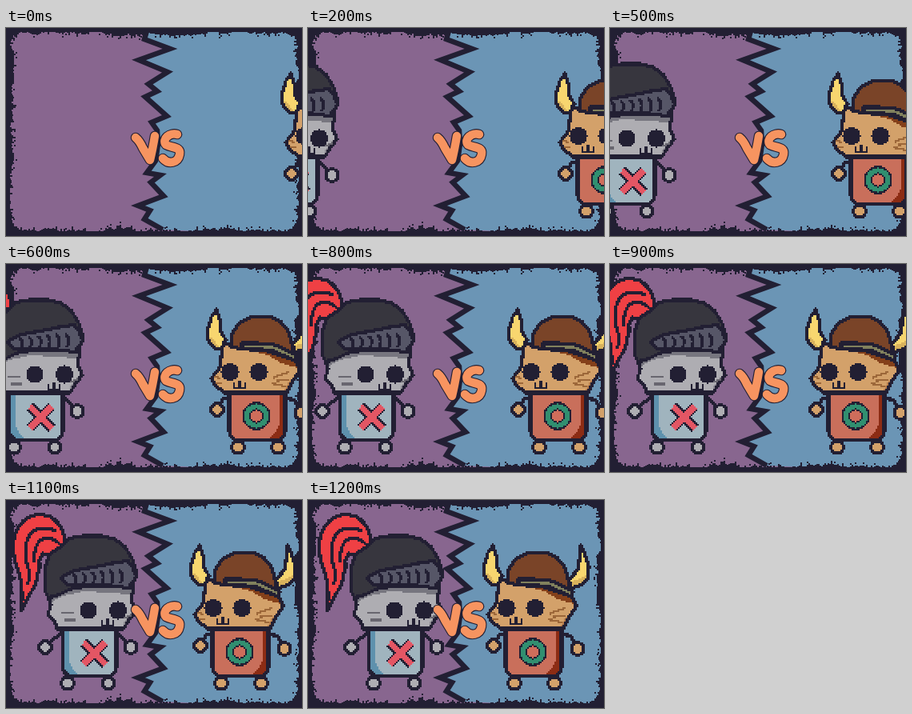
Recreate the animation shown at these times as an HTML page with a canvas. Size 370 px wide and 260 px high, loop 1300 ms.

```html
<!DOCTYPE html>
<html lang="en">
<head>
<meta charset="utf-8">
<title>Versus</title>
<style>
  html, body { margin: 0; width: 100%; height: 100%; overflow: hidden; background: #221f33; }
  canvas { display: block; width: 100vw; height: 100vh; image-rendering: pixelated; }
</style>
</head>
<body>
<canvas id="stage" width="370" height="260"></canvas>
<script>
const W = 370, H = 260, INK = '#221f33';
const STEP = 100, LOOP = 1300;

const newLayer = () => {
  const canvas = document.createElement('canvas');
  canvas.width = W;
  canvas.height = H;
  return canvas.getContext('2d');
};

function seeded(seed) {
  return () => (seed = (seed * 16807) % 2147483647) / 2147483647;
}

const disc = (x, y, r) => `M${x - r} ${y}a${r} ${r} 0 1 0 ${2 * r} 0a${r} ${r} 0 1 0 ${-2 * r} 0Z`;

// Plots vector shapes on a coarse grid for a hard-edged pixel look.
function pixelPen(ctx, cell = 2) {
  const plot = (color, test) => {
    ctx.fillStyle = color;
    for (let y = 0; y < H; y += cell)
      for (let x = 0; x < W; x += cell)
        if (test(x + cell / 2, y + cell / 2)) ctx.fillRect(x, y, cell, cell);
  };
  const fill = (d, color) => {
    const path = new Path2D(d);
    plot(color, (x, y) => ctx.isPointInPath(path, x, y));
  };
  const line = (d, color = INK, width = 4.4) => {
    const path = new Path2D(d);
    ctx.lineWidth = width;
    ctx.lineJoin = 'round';
    plot(color, (x, y) => ctx.isPointInStroke(path, x, y));
  };
  // Details are clipped to the shape and sit under its outline.
  const shape = (d, color, details = []) => {
    fill(d, color);
    const clip = new Path2D(d);
    for (const [detail, tint] of details) {
      const path = new Path2D(detail);
      plot(tint, (x, y) => ctx.isPointInPath(clip, x, y) && ctx.isPointInPath(path, x, y));
    }
    line(d);
  };
  return { fill, line, shape };
}

function drawBackdrop() {
  const ctx = newLayer();
  const crack = [[177, 0], [173, 14], [205, 26], [166, 40], [202, 55], [178, 70], [189, 79],
    [174, 86], [201, 110], [182, 118], [189, 128], [190, 145], [187, 166], [176, 181],
    [193, 184], [181, 193], [197, 210], [165, 222], [180, 228], [173, 239], [196, 252]];
  const trace = () => {
    ctx.beginPath();
    crack.forEach(([x, y]) => ctx.lineTo(x, y));
  };
  ctx.fillStyle = '#88668f';
  ctx.fillRect(0, 0, W, H);
  trace();
  ctx.lineTo(W, H);
  ctx.lineTo(W, 0);
  ctx.fillStyle = '#6b95b5';
  ctx.fill();
  trace();
  ctx.strokeStyle = INK;
  ctx.lineWidth = 6.5;
  ctx.miterLimit = 12;
  ctx.stroke();

  const random = seeded(91);
  ctx.fillStyle = INK;
  const ragged = (length, base, place) => {
    let drift = 0;
    for (let p = 0; p < length; p += 2) {
      drift = Math.max(0, Math.min(5, drift + (random() - 0.5) * 4));
      const corner = Math.max(0, 7 - Math.min(p, length - p) * 0.4);
      const depth = Math.round(base + drift + corner + (random() < 0.12 ? 3 : 0));
      place(p, depth, 0);
      if (random() < 0.08) place(p, 2, depth + 2);
    }
  };
  ragged(W, 5, (p, d, from) => ctx.fillRect(p, from, 2, d));
  ragged(W, 6, (p, d, from) => ctx.fillRect(p, H - from - d, 2, d));
  ragged(H, 5, (p, d, from) => ctx.fillRect(from, p, d, 2));
  ragged(H, 4, (p, d, from) => ctx.fillRect(W - from - d, p, d, 2));
  return ctx.canvas;
}

function drawFace(pen, eyes, eyeY, mouthX, mouthY) {
  eyes.forEach(x => pen.fill(disc(x, eyeY, 11), INK));
  pen.line(`M${mouthX - 7} ${mouthY - 5}v5q4 6 7-2v-3v3q3 8 7 2v-5`, INK, 3);
}

function drawLimbs(pen, skin, arms, hands, feet) {
  arms.forEach(arm => pen.line(arm));
  [...hands, ...feet].forEach(([x, y]) => pen.shape(disc(x, y, 7.6), skin));
}

function drawKnight() {
  const ctx = newLayer();
  const pen = pixelPen(ctx);
  const skin = '#aeadb2', shade = '#77767f';

  pen.shape('M78 64V45Q72 26 58 20Q40 15 27 26Q14 39 14 58Q14 73 20 88Q27 106 24 138' +
    'Q31 127 34 118Q44 106 44 92Q49 84 46 76L51 67Q64 70 78 64Z', '#ef4044');
  for (const d of ['M74 57Q60 42 47 51Q39 60 41 78', 'M68 39Q48 30 36 42Q26 54 31 80',
    'M31 78Q36 92 32 106'])
    pen.line(d, INK, 4);

  drawLimbs(pen, skin, ['M77 164L57 180', 'M142 164L158 180'],
    [[54, 184], [161, 184]], [[82, 229], [133, 229]]);
  pen.shape('M76 162H143V208Q142 219 132 220H88Q77 219 76 208Z', '#a0b4be',
    [['M76 162H83V196Q84 209 98 220H76Z', '#5e91ad']]);
  pen.line('M102 178L129 205M129 178L102 205', INK, 12);
  pen.line('M102 178L129 205M129 178L102 205', '#e35664', 7.5);

  pen.shape('M58 120L61 132L57 144L66 152L69 161H152L158 151L167 139L162 126L164 108L120 98L80 104Z', skin,
    [['M55 132L75 120L103 114L164 118V98H55Z', shade],
      ['M164 143L154 150L149 162H168Z', '#8b8991']]);
  drawFace(pen, [108, 145], 138, 132, 155);
  pen.line('M74 141H90M78 150H91M153 148L162 144', '#68666f', 3);

  pen.shape('M58 122L54 114V84L60 67L76 57L84 48L101 45H125L141 49L154 59L163 74L169 94' +
    'L160 110L142 107L110 107L86 111L70 119Z', '#37363e');
  pen.shape('M74 97L91 88L114 84L138 79L157 76L163 83L168 96L158 110L130 106L101 107L82 106Z', '#565667');
  for (let i = 0; i < 6; i++) {
    const x = 89 + i * 11.5;
    pen.line(`M${x - 1} ${92 - i}Q${x + 6} ${96 - i} ${x + 2} 104`, INK, 3.8);
  }
  return ctx.canvas;
}

function drawViking() {
  const ctx = newLayer();
  const pen = pixelPen(ctx);
  const skin = '#d3a16a', horn = '#f8d66f', hornShade = '#d9b25c';

  drawLimbs(pen, skin, ['M248 167L239 169L234 177', 'M316 167L328 170L336 181'],
    [[232, 182], [337, 186]], [[258, 229], [308, 229]]);
  pen.shape('M247 162H317V208Q316 219 306 220H258Q248 219 247 208Z', '#c96f5b',
    [['M310 162H317V220H295Q309 209 310 196Z', '#8c2c14']]);
  [[17.5, INK], [15, '#318f70'], [9, INK], [7, '#cf6d5b']]
    .forEach(([r, color]) => pen.fill(disc(281, 190, r), color));

  pen.shape('M231 57L236 72L237 86L243 95L241 107L230 106L221 96L220 82L225 66Z', horn,
    [['M219 88L229 96L236 108H219Z', hornShade]]);
  pen.shape('M341 57L347 70L351 84L350 97L342 106L329 110L326 100L333 92L338 86Z', horn,
    [['M353 88L343 97L327 103V112H353Z', hornShade]]);
  pen.shape('M249 106L250 88L259 74L274 66H298L311 72L321 84L325 97L327 118L290 110Z', '#7a4428');

  pen.shape('M240 97L251 104L264 106L296 109L330 121L336 132L325 149L319 161H241L230 152L225 143' +
    'L235 130L237 116Z', skin,
    [['M259 105L296 114L312 124L334 130V108Z', '#84401a'],
      ['M336 140L322 146L314 162H336Z', '#b77d4c']]);
  drawFace(pen, [248, 284], 135, 260, 153);
  pen.line('M302 142L321 135M300 149L317 153M306 146L322 145M229 141L236 143M231 149L237 148', '#9c6739', 2.6);
  pen.shape('M262 99L282 99L304 101L331 114L330 121L303 109L280 106L263 105Z', '#81815d');
  return ctx.canvas;
}

function drawVersus() {
  const ctx = newLayer();
  const strokes = [
    'M162 137Q167 141 171 150L180 165Q183 153 186 135',
    'M214 133C205 130 194 139 200 146C207 150 219 148 217 158C215 169 203 171 196 163'
  ];
  ctx.lineCap = ctx.lineJoin = 'round';
  for (const d of strokes)
    for (const [color, width] of [[INK, 12.6], ['#f79460', 10.4]]) {
      ctx.strokeStyle = color;
      ctx.lineWidth = width;
      ctx.stroke(new Path2D(d));
    }
  return ctx.canvas;
}

// Evenly spaced keys, blended linearly.
function track(keys, position) {
  const i = Math.min(Math.floor(position), keys.length - 2);
  return Math.round(keys[i] + (keys[i + 1] - keys[i]) * (position - i));
}

const KNIGHT_X = [-167, -131, -102, -72, -36, -11, 0];
const VIKING_X = [125, 90, 75, 32, 31, 21, 0];
const backdrop = drawBackdrop(), knight = drawKnight();
const viking = drawViking(), versus = drawVersus();
const stage = document.getElementById('stage').getContext('2d');

function render(time) {
  const step = Math.floor((time % LOOP) / STEP);
  stage.drawImage(backdrop, 0, 0);
  stage.drawImage(knight, track(KNIGHT_X, step / 2), 0);
  stage.drawImage(viking, track(VIKING_X, step / 2), 0);
  stage.drawImage(versus, 0, 0);
}

const start = performance.now();
function tick() {
  render(performance.now() - start);
  requestAnimationFrame(tick);
}
tick();
</script>
</body>
</html>
```
